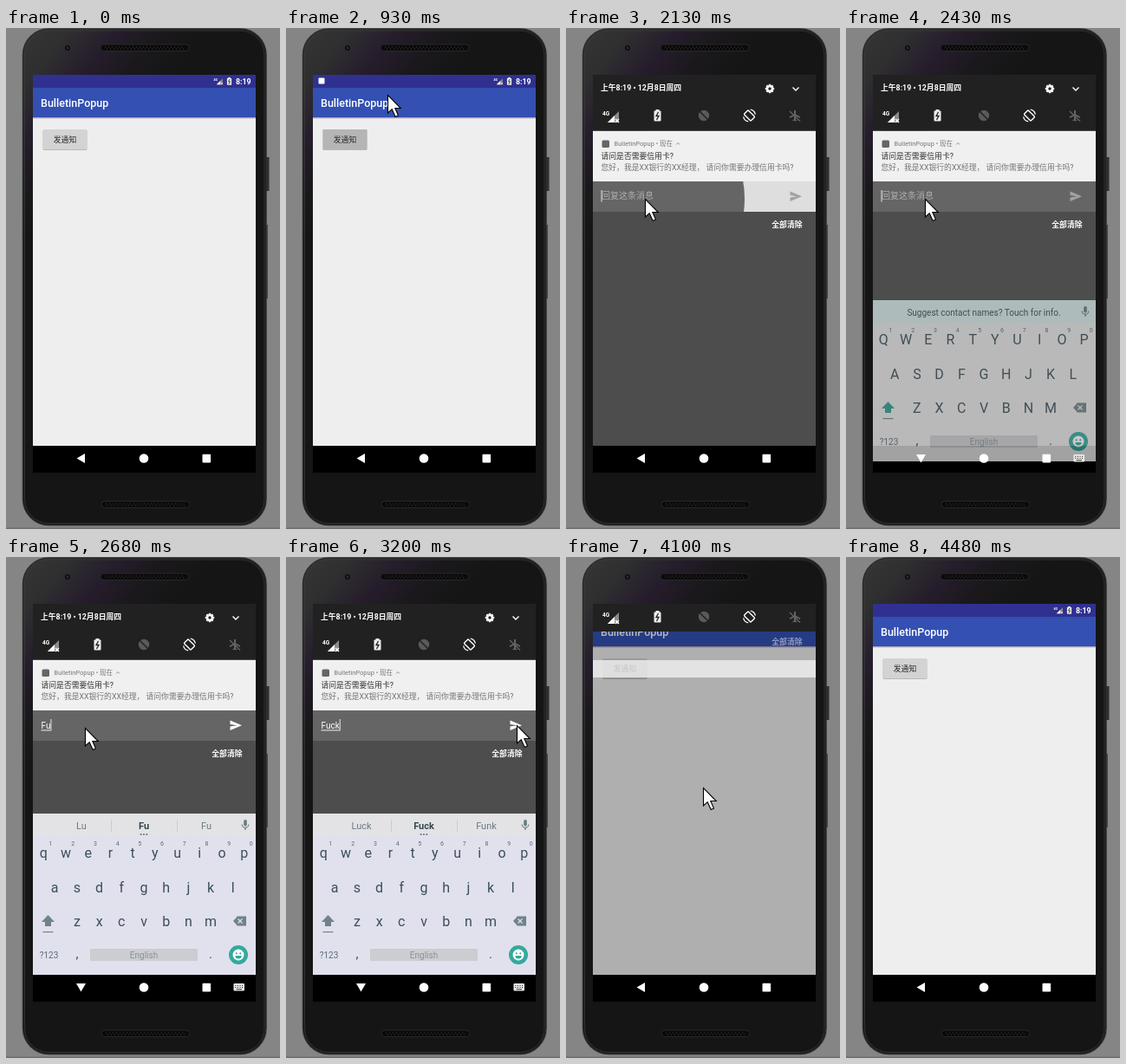
These frames come from a looping animation (316 px wide and 578 px high, 4.78 s). An HTML page with a canvas:

```html
<!DOCTYPE html>
<html lang="zh">
<head>
<meta charset="utf-8">
<title>Notification reply</title>
<style>
html, body { margin: 0; width: 100%; height: 100%; overflow: hidden; background: #858585; }
canvas { display: block; width: 316px; height: 578px; }
</style>
</head>
<body>
<canvas id="stage"></canvas>
<script>
const W = 316, H = 578, LOOP = 4780, STEP = 100;
const FONT = 'Roboto, "Noto Sans CJK SC", "Noto Sans CJK", "Noto Sans", sans-serif';
const APP = 'BulletinPopup', WORD = 'Fuck';
const SCREEN = { x: 31, y: 54, w: 257, bottom: 482 };
const bursts = [100, 630, 1230, 1830, 2430, 2980, 3600, 4180];
// Pointer moves: start, end, x, y.
const moves = [[100, 500, 84, 136], [530, 630, 66, 128], [830, 1030, 134, 60], [1030, 1430, 146, 267],
  [1830, 2030, 91, 197], [2980, 3180, 266, 194], [3500, 3700, 158, 266]];

const canvas = document.getElementById('stage');
const c = canvas.getContext('2d');
const ratio = window.devicePixelRatio || 1;
canvas.width = W * ratio;
canvas.height = H * ratio;

const ramp = (t, a, b) => Math.min(1, Math.max(0, (t - a) / (b - a)));
const mix = (a, b, p) => a + (b - a) * p;
const easeOut = p => 1 - (1 - p) ** 2;

// The picture moves in short bursts of even steps and rests between them.
function stepped(now) {
  const start = bursts.filter(b => b <= now).pop();
  return start ? start + STEP * Math.min(5, Math.floor((now - start) / STEP)) : 0;
}

function rect(x, y, w, h, fill) { c.fillStyle = fill; c.fillRect(x, y, w, h); }
function band(y, h, fill) { rect(SCREEN.x, y, SCREEN.w, h, fill); }
function round(x, y, w, h, r, fill, stroke, lw = 1) {
  c.beginPath();
  c.roundRect(x, y, w, h, r);
  if (fill) { c.fillStyle = fill; c.fill(); }
  if (stroke) { c.strokeStyle = stroke; c.lineWidth = lw; c.stroke(); }
}
function disc(x, y, r, fill, end = 7) {
  c.beginPath();
  c.arc(x, y, r, 0, end);
  c.fillStyle = fill;
  c.fill();
}
function trace(pts) {
  c.beginPath();
  for (let i = 0; i < pts.length; i += 2) c.lineTo(pts[i], pts[i + 1]);
}
function poly(pts, fill) { trace(pts); c.closePath(); c.fillStyle = fill; c.fill(); }
function line(pts, color, lw = 1) { trace(pts); c.strokeStyle = color; c.lineWidth = lw; c.stroke(); }
function cross(x, y, r, color, lw) {
  line([x - r, y - r, x + r, y + r], color, lw);
  line([x + r, y - r, x - r, y + r], color, lw);
}
function arc(x, y, r, a, b, color, lw) {
  c.beginPath();
  c.arc(x, y, r, a, b);
  c.strokeStyle = color;
  c.lineWidth = lw;
  c.stroke();
}
function text(s, x, y, size, color, align = 'left', weight = 400) {
  c.font = `${weight} ${size}px ${FONT}`;
  c.textAlign = align;
  c.fillStyle = color;
  c.fillText(s, x, y);
}
function at(x, y, draw, scale = 1) {
  c.save();
  c.translate(x, y);
  c.scale(scale, scale);
  draw();
  c.restore();
}
function clipped(x, y, w, h, draw) {
  c.save();
  c.beginPath();
  c.rect(x, y, w, h);
  c.clip();
  draw();
  c.restore();
}

function speaker(x, y) {
  round(x, y, 102, 7.5, 4, '#0a0a0a', '#282828');
  for (let i = 0; i < 46; i++) rect(x + 5 + i * 2, y + 2 + i % 2 * 2, 1, 2, '#242424');
}

function phone() {
  rect(0, 0, W, H, '#858585');
  rect(0, 576.5, W, 2, '#6d6d6d');
  rect(299, 149, 4.5, 39, '#303030');
  rect(299, 227, 3, 85, '#484848');
  const body = c.createLinearGradient(20, 0, 150, 110);
  ['#363636', '#2f2f30', '#261d2c', '#1a181b', '#151515'].forEach((color, i) => body.addColorStop(i / 4, color));
  round(19.5, 1, 280.5, 572.5, 30, body, '#2c2c2c', 1.4);
  round(21.5, 3, 276.5, 568.5, 28, null, '#3a3a3a', .8);
  disc(71, 23, 3, '#0d0d0f');
  disc(71, 23, 1.4, '#2e2e36');
  speaker(109, 19);
  speaker(110, 546);
}

function signal(x, y, scale) {
  at(x, y, () => {
    poly([9, -6, 9, 7, -4, 7], '#8b8b8b');
    poly([4, -1, 4, 7, -4, 7], '#fff');
    text('4G', -10, -1, 6.5, '#fff', 'left', 700);
    cross(7, 5, 2, '#fff', 1.3);
  }, scale);
}

function battery(x, y, scale) {
  at(x, y, () => {
    rect(-2, -7, 4, 2, '#eee');
    round(-4, -5.5, 8, 12, 1, '#eee');
    line([1, -4, -1.5, .5, 1.5, .5, -1, 5], '#222', 1.3);
  }, scale);
}

function app(t) {
  band(54, 428, '#eeeeee');
  band(54, 15, '#303090');
  band(69, 34, '#3350b2');
  band(103, 1, '#a99fb9');
  band(104, 1, '#d8d3da');
  text(APP, 40, 91, 12.5, '#fff', 'left', 500);
  signal(245, 61.5, .55);
  battery(257.5, 61.5, .65);
  text('8:19', 265, 64.8, 8.8, '#fff', 'left', 700);
  if (t >= 830 && t < 3800) round(37.5, 57.5, 7, 7, 1, '#fff');
  round(42.5, 117.5, 51, 23.5, 1.5, '#b9b9b9');
  round(42.5, 117, 51, 23, 1.5, '#d3d3d3');
  if (t >= 730 && t < 1030)
    clipped(42.5, 117, 51, 23, () => disc(66, 128, mix(14, 45, ramp(t, 730, 830)), 'rgba(0,0,0,.14)'));
  text('发通知', 68, 131.7, 8.8, '#2a2a2a', 'center');
}

function gear() {
  for (let i = 0; i < 8; i++) {
    rect(-1.2, -5.2, 2.4, 3, '#fff');
    c.rotate(Math.PI / 4);
  }
  arc(0, 0, 2.9, 0, 7, '#fff', 2.3);
}

function rotation() {
  c.rotate(-Math.PI / 4);
  round(-3.4, -5.5, 6.8, 11, 1, null, '#fff', 1.4);
  for (const mid of [0, Math.PI]) arc(0, 0, 7, mid - .6, mid + .6, '#fff', 1.2);
}

function airplane() {
  const color = '#656565';
  line([0, -6, 0, 6], color, 2);
  line([-6, 2.2, 0, -1, 6, 2.2], color, 1.7);
  line([-2.5, 5.5, 2.5, 5.5], color, 1.2);
  line([-6, -5, 6, 6.5], color, 1.2);
}

function header(dy) {
  at(0, dy, () => {
    band(40, 77, '#212121');
    text('上午8:19 • 12月8日周四', 40, 71.4, 8.8, '#fff', 'left', 700);
    at(235, 69, gear);
    line([261.5, 67.5, 265, 71, 268.5, 67.5], '#fff', 1.4);
    signal(52, 101, 1);
    battery(105.5, 100, 1);
    disc(159, 100, 6.2, '#5a5a5a');
    line([153, 94, 165, 106], '#212121', 1.5);
    at(211.5, 100, rotation);
    at(264, 100, airplane);
  });
}

const letters = t => Math.min(WORD.length, Math.max(0, Math.floor((t - 2430) / STEP)));

function replyField(t) {
  const typed = WORD.slice(0, letters(t)), sent = t >= 3280;
  if (typed) text(typed, 40.5, 197.8, 10, sent ? '#bdbdbd' : '#fff');
  else text('回复这条消息', 41, 197.4, 10, '#aeaeae', 'left', 500);
  if (sent) {
    const a = -.4 + (t - 3700) / 110;
    arc(265.5, 195, 4.6, a, a + 1.4, '#fff', 1.7);
    return;
  }
  const w = typed ? c.measureText(typed).width : 0;
  rect(40.5, 199.5, w, .9, '#fff');
  rect(40.5 + w, 187, 1, 13.5, '#e4e4e4');
  at(258.5, 194.3, () => {
    poly([0, -5.8, 13.5, 0, 0, 5.8, 0, 1.3, 8, 0, 0, -1.3], typed ? '#fff' : '#a2a2a2');
  });
}

function replyRow(t) {
  band(177, 35, '#dedede');
  text('回复', 41, 196.7, 8.8, '#808080');
  if (t < 2030) return;
  clipped(SCREEN.x, 177, SCREEN.w, 35, () => {
    disc(91, 197, mix(25, 205, ramp(t, 2030, 2230)), '#656565');
    if (t >= 2130) replyField(t);
  });
}

function card(t, dy, close) {
  const h = 93 - 75 * close;
  if (h <= 0) return;
  c.globalAlpha = 1 - .2 * close;
  clipped(SCREEN.x, 119 + dy, SCREEN.w, h + 2, () => at(0, dy, () => {
    band(119, 58, '#f0f0f0');
    if (close > .9) return;
    const title = APP + ' • 现在';
    round(41.5, 129.5, 8.5, 8.5, 1.5, '#666');
    text(title, 55.5, 136.2, 7.5, '#777');
    const x = 59.5 + c.measureText(title).width;
    line([x, 134.5, x + 2, 132.5, x + 4, 134.5], '#777', .8);
    text('请问是否需要信用卡?', 40.5, 151.3, 8.8, '#303030');
    text('您好，我是XX银行的XX经理， 请问你需要办理信用卡吗?', 40.5, 163.7, 8.8, '#747474');
    replyRow(t);
  }));
  c.globalAlpha = 1;
}

function shade(t) {
  if (t < 1230 || t >= 4280) return;
  const left = 1 - ramp(t, 1130, 1530), close = Math.max(0, (t - 3800) / 300);
  const scrim = .675 * (1 - left ** 1.6) - .41 * close;
  band(54, 428, `rgba(0,0,0,${scrim})`);
  card(t, -256 * left ** 3, close);
  if (!left)
    text('全部清除', 272.5, 230.2 - 129 * close, 8.8, `rgba(255,255,255,${1 - .5 * close})`, 'right', 600);
  header(1 - 128 * left ** 3 - 32 * close);
}

function suggestions(t, upper, ink) {
  band(296, 26, upper ? '#d6ebe9' : '#e3e3e5');
  if (upper) {
    text('Suggest contact names? Touch for info.', 159, 313.8, 10, ink, 'center');
  } else {
    ['Luck', WORD, 'Funk'].forEach((word, i) => {
      const main = i === 1;
      text(word.slice(0, letters(t)), 87 + 72 * i, 313.8, 11, main ? '#33474f' : '#6b7b83', 'center', main ? 700 : 400);
      disc(155.6 + i * 3.4, 320, 1.1, '#687a82');
    });
    for (const x of [121, 197]) rect(x, 303, .8, 14, '#c2c8cc');
  }
  round(274.2, 303, 3.6, 7.5, 1.8, '#687a82');
  arc(276, 308.5, 3.8, 0, Math.PI, '#687a82', 1.1);
  rect(275.4, 312, 1.2, 3, '#687a82');
}

function smiley(x, y) {
  const teal = '#35a99c';
  disc(x, y, 11, teal);
  disc(x, y, 6.5, '#fff');
  for (const side of [-2.3, 2.3]) disc(x + side, y - 1.7, 1.1, teal);
  disc(x, y + 1, 3.6, teal, Math.PI);
}

function keys(t) {
  const upper = t < 2530, ink = '#3c4f59', grey = '#70828a', pitch = 25.7;
  const back = upper ? '#e8e8e8' : '#e1e1ee';
  band(322, 160, back);
  suggestions(t, upper, ink);
  ['qwertyuiop', 'asdfghjkl', 'zxcvbnm'].forEach((row, r) => {
    const x = 159 - (row.length - 1) * pitch / 2;
    [...row].forEach((k, i) => text(upper ? k.toUpperCase() : k, x + i * pitch, 347.3 + r * 39.2, 16, ink, 'center'));
  });
  for (let i = 0; i < 10; i++) text((i + 1) % 10, 51.5 + i * pitch, 333, 7, '#596b74', 'center');
  const tint = upper ? '#2f9c91' : grey;
  poly([48.5, 413, 56, 421, 41, 421], tint);
  rect(45, 420, 7, 6, tint);
  rect(42.5, 432, 12, 1.2, grey);
  poly([262, 420, 267, 414.5, 267, 425.5], grey);
  rect(266.5, 414.5, 10.5, 11, grey);
  cross(270, 420, 2.5, back, 1.3);
  text('?123', 49.5, 462.5, 10, '#596b74', 'center');
  text(',', 82, 463, 15, ink, 'center');
  round(97, 452, 124, 14, 1, '#cccdd0');
  text('English', 159, 462.5, 10, '#84939a', 'center');
  text('.', 236, 463, 15, ink, 'center');
  smiley(268, 459);
}

// Fading is done by veiling the keys with what lies beneath them.
function keyboard(t) {
  if (t < 2330 || t >= 3480) return;
  const shown = ramp(t, 2330, 2530) - ramp(t, 3280, 3480);
  const dy = 36 * (1 - shown), veil = .6 * (1 - shown);
  at(0, dy, () => keys(t));
  c.globalAlpha = veil;
  band(296 + dy, 186 - dy, '#4e4e4e');
  band(482, dy, '#000');
  c.globalAlpha = 1;
}

function navIcons(t) {
  const typing = t >= 2330 && t < 3380;
  at(86.5, 496.5, () => {
    if (typing) c.rotate(-Math.PI / 2);
    poly([-5, 0, 4.5, -5.5, 4.5, 5.5], '#fff');
  });
  if (typing) {
    round(262.5, 492, 12.5, 8.5, 1, '#eee');
    for (let i = 0; i < 8; i++) rect(264.2 + i % 4 * 2.6, 493.7 + (i >> 2) * 2.2, 1.2, 1.1, '#333');
    rect(265.5, 498.2, 6.5, 1, '#333');
  }
  disc(159, 496.5, 5.3, '#fff');
  round(226.5, 491.8, 9.6, 9.6, 1, '#fff');
}

function pointer(t) {
  if (t < 100 || t >= 4480) return;
  let x = 293, y = 463;
  for (const [a, b, toX, toY] of moves) {
    const p = easeOut(ramp(t, a, b));
    x = mix(x, toX, p);
    y = mix(y, toY, p);
  }
  at(Math.round(x) + .5, Math.round(y) + .5, () => {
    poly([0, 0, 0, 20.5, 4.7, 16.2, 8.7, 25, 12, 23.5, 8.3, 15, 14.8, 15], '#fff');
    c.strokeStyle = '#000';
    c.lineWidth = 1.1;
    c.stroke();
  });
}

function draw(t) {
  c.setTransform(ratio, 0, 0, ratio, 0, 0);
  phone();
  clipped(SCREEN.x, SCREEN.y, SCREEN.w, 459, () => {
    app(t);
    shade(t);
    band(SCREEN.bottom, 31, '#000');
    keyboard(t);
    navIcons(t);
  });
  pointer(t);
}

const start = performance.now();
function frame() {
  draw(stepped((performance.now() - start) % LOOP));
  requestAnimationFrame(frame);
}
frame();
</script>
</body>
</html>
```
